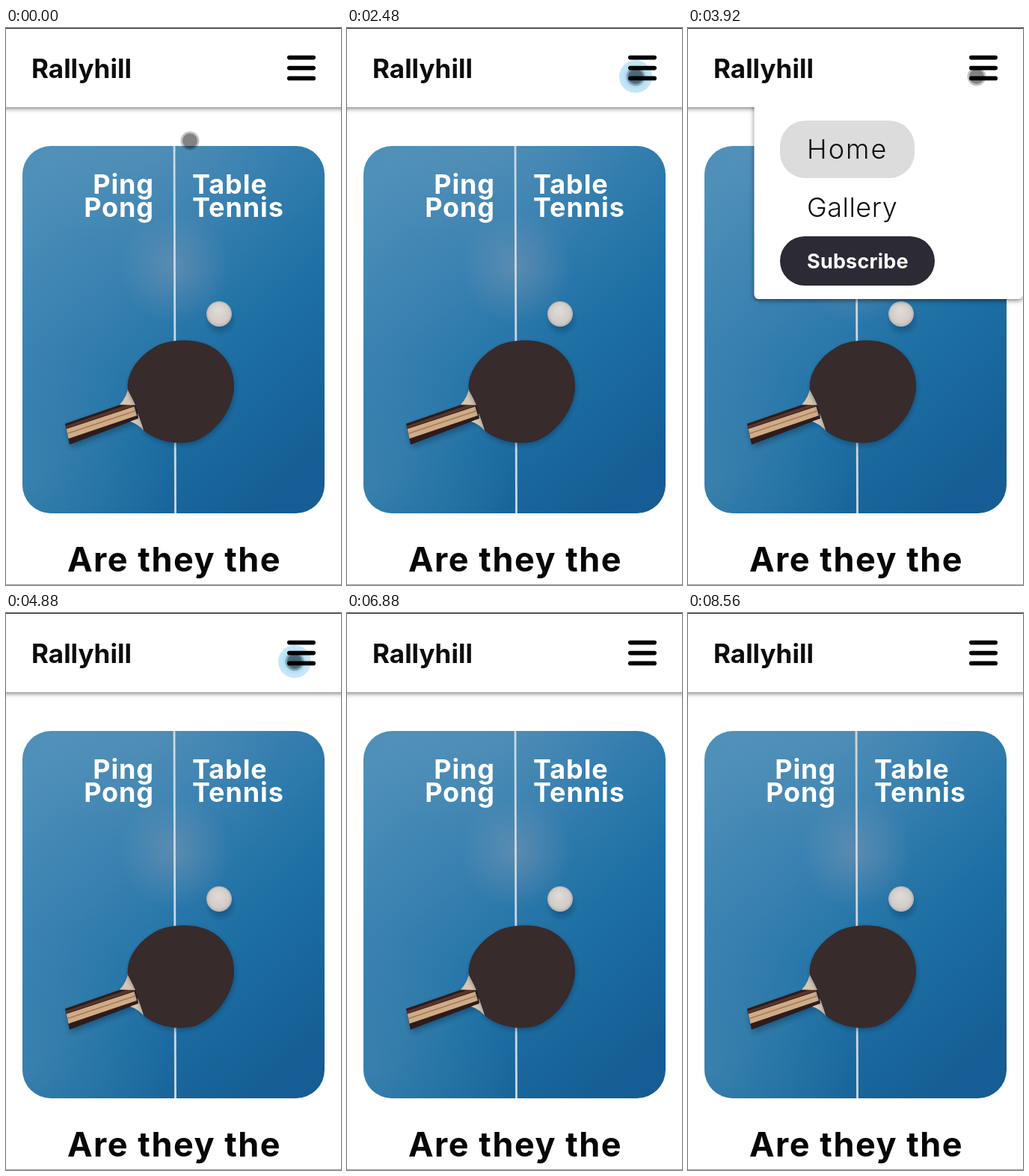
Animation, 448 px wide and 746 px high, one loop 8.64 s. Source, as an HTML page with a canvas:

```html
<!DOCTYPE html>
<html lang="en">
<head>
<meta charset="utf-8">
<title>Ping pong landing page</title>
<style>
  html, body { margin: 0; width: 100%; height: 100%; overflow: hidden; background: #fff; }
  canvas { display: block; }
</style>
</head>
<body>
<canvas id="stage" width="448" height="746"></canvas>
<script>
const ctx = document.getElementById('stage').getContext('2d');
const LOOP = 8640;
const FONT = 'Montserrat, Inter, "Open Sans", sans-serif';
const MENU = { open: 2560, close: 4320 };
const MOVE = { start: 700, end: 1920 };
const FADE = { start: 5360, end: 5760 };
const CLICKS = [[2320, 3120], [4160, 5040]];

const clamp = v => Math.max(0, Math.min(1, v));
const ramp = (t, a, b) => clamp((t - a) / (b - a));
const ease = k => k * k * (3 - 2 * k);

function text(str, x, y, size, weight, color, spacing = 0, align = 'left') {
  ctx.font = `${weight} ${size}px ${FONT}`;
  ctx.letterSpacing = spacing + 'px';
  ctx.textAlign = align;
  ctx.fillStyle = color;
  ctx.fillText(str, x, y);
}

function fillPath(d, fill) {
  ctx.fillStyle = fill;
  ctx.fill(new Path2D(d));
}

function pill(x, y, w, h, r, fill) {
  ctx.fillStyle = fill;
  ctx.beginPath();
  ctx.roundRect(x, y, w, h, r);
  ctx.fill();
}

function disc(x, y, r, fill) {
  ctx.fillStyle = fill;
  ctx.beginPath();
  ctx.arc(x, y, r, 0, 7);
  ctx.fill();
}

function glow(x, y, r, rgb, alpha) {
  const g = ctx.createRadialGradient(x, y, 0, x, y, r);
  g.addColorStop(0, `rgba(${rgb},${alpha})`);
  g.addColorStop(1, `rgba(${rgb},0)`);
  ctx.fillStyle = g;
  ctx.fillRect(x - r, y - r, 2 * r, 2 * r);
}

function shadow(color, blur, dx, dy) {
  ctx.shadowColor = color;
  ctx.shadowBlur = blur;
  ctx.shadowOffsetX = dx;
  ctx.shadowOffsetY = dy;
}

function drawPaddle() {
  ctx.save();
  shadow('rgba(5,40,75,.45)', 8, 2, 4);
  fillPath('M79 530 L160 502 Q164 492 164 478 L186 540 Q180 527 172 525 L85 558 Z', '#2d1c1a');
  ctx.restore();

  // Stripes run along the handle.
  fillPath('M80 533 L170 502 L171.5 506 L80.7 536 Z', '#5a352b');
  fillPath('M80.7 537 L171.5 507 L175 519 L83.5 550 Z', '#cfac87');
  fillPath('M81.8 542.5 L173 512 L173.4 513.4 L82.1 544 Z', '#a37a5a');
  fillPath('M152 504.5 Q162 494 164 478 L175 505 Z', '#d8c6b1');
  fillPath('M166 527 Q176 530 185 540 L176 515 L177 523 Z', '#d8c6b1');

  ctx.save();
  shadow('rgba(5,40,75,.4)', 7, 1, 3);
  fillPath('M163 485 C160 462 178 437 205 424 C228 415 261 416 280 430 C298 443 306 462 305 483 ' +
    'C303 512 280 543 253 553 C230 560 200 553 184 539 C180 520 172 501 163 485 Z', '#372b2c');
  ctx.restore();
}

function drawCard() {
  ctx.save();
  ctx.beginPath();
  ctx.roundRect(22, 158, 404, 492, 38);
  ctx.clip();
  const g = ctx.createLinearGradient(50, 190, 410, 590);
  g.addColorStop(0, '#4f90b9');
  g.addColorStop(0.35, '#3780b0');
  g.addColorStop(0.65, '#1d6fa4');
  g.addColorStop(1, '#155d94');
  ctx.fillStyle = g;
  ctx.fillRect(22, 158, 404, 492);
  glow(225, 320, 75, '150,160,180', 0.4);
  glow(200, 150, 170, '110,155,185', 0.25);
  glow(30, 610, 190, '85,145,180', 0.4);

  ctx.strokeStyle = '#ccd8e1';
  ctx.lineWidth = 2.8;
  ctx.beginPath();
  ctx.moveTo(225, 158);
  ctx.lineTo(226.5, 650);
  ctx.stroke();

  glow(287, 391, 22, '5,55,95', 0.7);
  const b = ctx.createRadialGradient(284, 378, 3, 285, 383, 17);
  b.addColorStop(0, '#dfd9d5');
  b.addColorStop(0.75, '#d2ccc9');
  b.addColorStop(1, '#b5b2b2');
  disc(285, 383, 17, b);
  drawPaddle();
  ctx.restore();

  text('Ping', 198, 222, 36, 700, '#fff', 0.9, 'right');
  text('Pong', 198, 253, 36, 700, '#fff', 0.9, 'right');
  text('Table', 249, 222, 36, 700, '#fff', 0.9);
  text('Tennis', 249, 253, 36, 700, '#fff', 0.9);
}

function drawMenu() {
  ctx.save();
  shadow('rgba(0,0,0,.5)', 6, 0, 2);
  pill(88.5, 90, 359.5, 273, 6, '#fff');
  ctx.restore();
  pill(123, 124, 180, 77, 34, '#dcdcdc');
  text('Home', 159, 175, 36, 300, '#111', 2);
  text('Gallery', 159, 253, 36, 300, '#111', 0.5);
  pill(123, 279, 207, 66, 33, '#2c2a35');
  text('Subscribe', 159, 322, 27, 700, '#fff', 0.2);
}

function drawHeader(menuOpen) {
  ctx.save();
  shadow('rgba(0,0,0,.5)', 6, 0, 2);
  ctx.fillStyle = '#fff';
  ctx.fillRect(-10, 0, 468, 106);
  ctx.restore();
  if (menuOpen) drawMenu();
  ctx.fillStyle = '#fff';
  ctx.fillRect(0, 0, 448, 106);
  text('Rallyhill', 34, 67, 35, 700, '#0c0c0c');
  for (const y of [36.8, 50.8, 64.6]) pill(376, y, 38, 5.6, 2.8, '#000');
}

function drawCursor(t) {
  const alpha = 1 - ramp(t, FADE.start, FADE.end);
  if (!alpha) return;
  const k = ease(ramp(t, MOVE.start, MOVE.end));
  const x = 246 + 140 * k;
  const y = 151 - 86 * k - 48 * k * (1 - k);
  ctx.save();
  ctx.globalCompositeOperation = 'multiply';
  for (const [from, to] of CLICKS) {
    const p = Math.min(ramp(t, from, from + 120), 1 - ramp(t, to - 160, to));
    if (!p) continue;
    ctx.globalAlpha = p;
    disc(x, y, 12 + 10 * p, 'rgba(135,206,240,.5)');
    glow(x, y, 18, '80,165,205', 0.5);
  }
  ctx.globalAlpha = alpha;
  disc(x, y, 12.5, 'rgba(120,120,120,.45)');
  disc(x, y, 10, 'rgba(90,90,90,.5)');
  ctx.restore();
}

function draw(t) {
  ctx.fillStyle = '#fff';
  ctx.fillRect(0, 0, 448, 746);
  drawCard();
  text('Are they the', 82, 728, 45, 700, '#060606', 1.5);
  drawHeader(t >= MENU.open && t < MENU.close);
  drawCursor(t);
  ctx.fillStyle = '#222';
  ctx.fillRect(0, 0, 448, 1);
  ctx.fillStyle = '#a0a0a0';
  ctx.fillRect(0, 745, 448, 1);
}

const start = performance.now();
function tick() {
  draw((performance.now() - start) % LOOP);
  requestAnimationFrame(tick);
}
tick();
</script>
</body>
</html>
```
